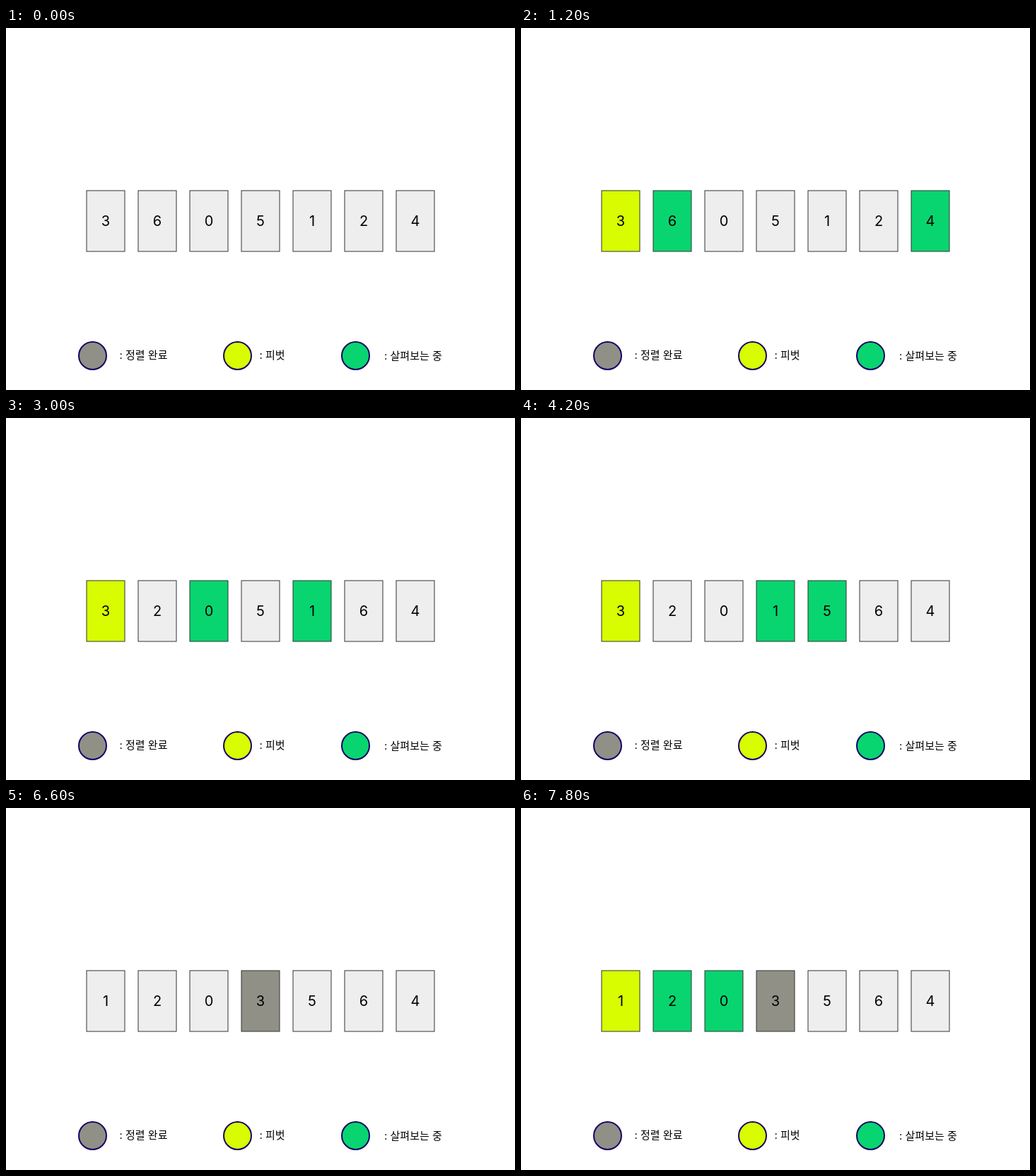
These frames come from a looping animation (720 by 512 pixels, 8000 ms). An HTML page:

```html
<!DOCTYPE html>
<html lang="ko">
<head>
<meta charset="utf-8">
<title>퀵 정렬</title>
<style>
  html, body { margin: 0; width: 100%; height: 100%; overflow: hidden; background: #fff; }
  svg { display: block; }
  text { font-family: Inter, "Noto Sans CJK KR", "Noto Sans CJK", sans-serif; fill: #000; }
  .card { stroke: #333; stroke-width: 1; }
  .digit { font-size: 20px; text-anchor: middle; }
  .dot { stroke: #160066; stroke-width: 2; }
  .label { font-size: 15px; }
</style>
</head>
<body>
<svg id="stage" width="720" height="512" viewBox="0 0 720 512"></svg>
<script>
const STEP = 600, LOOP = 8000;
const COLORS = { '.': '#eee', p: '#d8fc00', g: '#08d570', d: '#909087' };

// One row per step: card values, then card states (p pivot, g scanning, d done).
const STEPS = [
  ['3605124', '.......'],
  ['3605124', 'p......'],
  ['3605124', 'pg....g'],
  ['3605124', 'pg...g.'],
  ['3205164', 'pg...g.'],
  ['3205164', 'p.g.g..'],
  ['3205164', 'p..gg..'],
  ['3201564', 'p..gg..'],
  ['3201564', 'p..gg..'],
  ['3201564', 'g..g...'],
  ['1203564', 'g..g...'],
  ['1203564', '...d...'],
  ['1203564', 'p..d...'],
  ['1203564', 'pggd...']
];

const LEGEND = [
  ['d', 122.5, 160.5, 468, ': 정렬 완료'],
  ['p', 327.5, 358.5, 468, ': 피벗'],
  ['g', 494.5, 535, 469, ': 살펴보는 중']
];

const stage = document.getElementById('stage');

function add(tag, attrs, text = '') {
  const el = document.createElementNS('http://www.w3.org/2000/svg', tag);
  for (const key in attrs) el.setAttribute(key, attrs[key]);
  el.textContent = text;
  return stage.appendChild(el);
}

const cards = Array.from({ length: 7 }, (_, i) => {
  const x = 114 + 73 * i;
  return {
    box: add('rect', { class: 'card', x, y: 230, width: 54, height: 86 }),
    digit: add('text', { class: 'digit', x: x + 27, y: 280 })
  };
});

for (const [state, cx, x, y, text] of LEGEND) {
  add('circle', { class: 'dot', cx, cy: 463.5, r: 19.5, fill: COLORS[state] });
  add('text', { class: 'label', x, y }, text);
}

let shown = -1;
function show(index) {
  if (index === shown) return;
  shown = index;
  const [values, states] = STEPS[index];
  cards.forEach(({ box, digit }, i) => {
    box.setAttribute('fill', COLORS[states[i]]);
    digit.textContent = values[i];
  });
}

const start = performance.now();
function tick() {
  const time = (performance.now() - start) % LOOP;
  show(Math.floor(time / STEP));
  requestAnimationFrame(tick);
}
tick();
</script>
</body>
</html>
```
